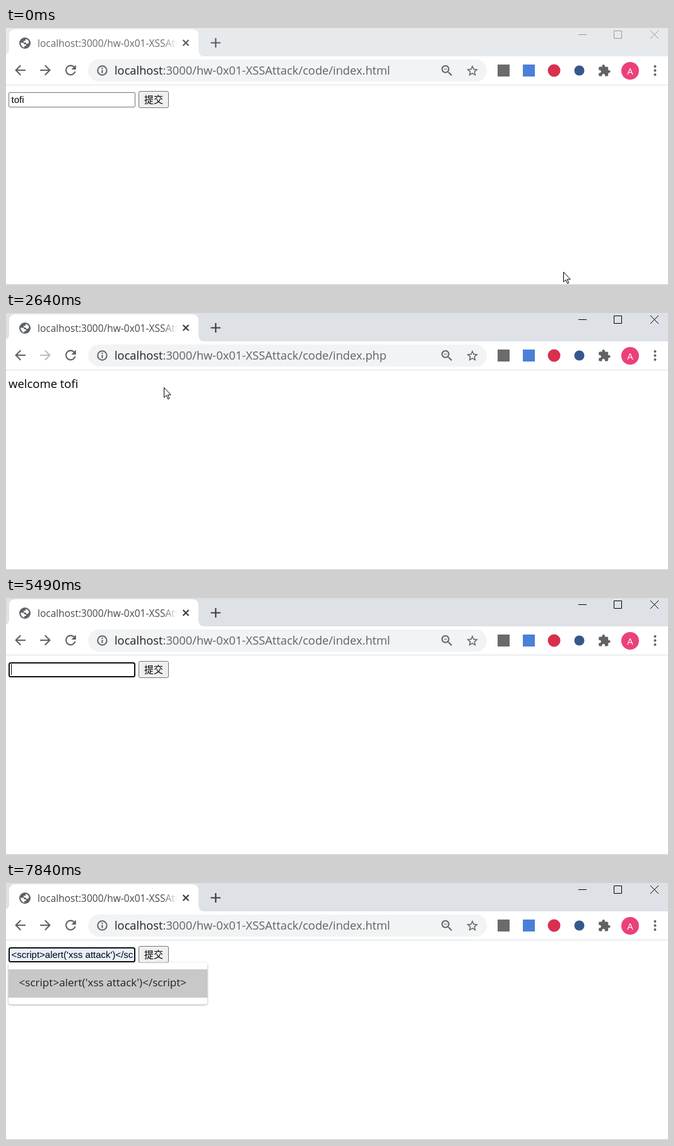
Recreate the animation shown at these times as an HTML page. Size 1049 by 408 pixels, loop 8 s.

```html
<!DOCTYPE html>
<html lang="en">
<head>
<meta charset="utf-8">
<title>Browser form</title>
<style>
  html, body { margin: 0; width: 100%; height: 100%; overflow: hidden; background: #fff; }
  svg { display: block; width: 100vw; height: 100vh; }
  text { white-space: pre; }
  .ui { font-family: "Open Sans", "Noto Sans", sans-serif; }
  .field { font: 15px "Liberation Sans", Arial, sans-serif; }
  .cjk { font: 15px "Noto Sans CJK SC", "Noto Sans CJK", sans-serif; }
  .icon { fill: #5f6368; }
  .line { fill: none; stroke: #5f6368; stroke-width: 2; }
</style>
</head>
<body>
<svg viewBox="0 0 1049 408">
  <defs>
    <linearGradient id="fade">
      <stop offset="0" stop-color="#fff" stop-opacity="0"/>
      <stop offset="1" stop-color="#fff"/>
    </linearGradient>
    <clipPath id="titleClip"><path d="M45 5H270V42H45z"/></clipPath>
    <clipPath id="fieldClip"><path d="M7 103H202V125H7z"/></clipPath>
    <filter id="shadow" x="-10%" y="-20%" width="120%" height="150%">
      <feDropShadow dx="0" dy="1" stdDeviation="1.5" flood-opacity=".4"/>
    </filter>
    <path id="arrowShape" d="M20 11H7.83l5.59-5.59L12 4l-8 8 8 8 1.41-1.41L7.83 13H20v-2z"/>
  </defs>

  <path fill="#fff" d="M0 0H1049V408H0z"/>

  <!-- tab strip -->
  <path id="strip" d="M0 0H1049V45H0z"/>
  <path fill="#fff" d="M0 45V42Q5 40 5 34V12Q5 2 15 2H295Q305 2 305 12V35Q305 45 315 45z"/>
  <g id="globe">
    <circle class="icon" cx="30" cy="24" r="9"/>
    <path fill="#fff" d="M31 17.500q4 .5 5.500 4.500l-1.500 3h-3l-1-2h-3v-2.500l3-.5zM23 23.500h4.500l2 2.500h2.500v2l-3 1v2q-5-1-6-7.500z"/>
  </g>
  <circle id="spinner" r="8.5" pathLength="360" fill="none" stroke-width="2.2"/>
  <g clip-path="url(#titleClip)">
    <text id="title" class="ui" x="50" y="30" font-size="15.5">localhost:3000/hw-0x01-XSSAttack</text>
    <path fill="url(#fade)" d="M248 5H272V42H248z"/>
  </g>
  <path id="tabMarks" fill="none" stroke-width="2.2" d="M280.500 19l9 9m0-9l-9 9M324.500 23.500h15.500M332.300 16v15"/>
  <path id="winButtons" fill="none" d="M907 10.500h13M963.500 4.500h12v12h-12zM1021 4l13 13m0-13l-13 13"/>

  <!-- toolbar -->
  <circle id="backHover" cx="22.5" cy="67.5" r="17.5"/>
  <use href="#arrowShape" class="icon" transform="translate(9.9 54.4) scale(1.05)"/>
  <use id="forward" href="#arrowShape" transform="translate(75.1 54.4) scale(-1.05 1.05)"/>
  <path id="reload" class="icon" transform="translate(89.9 54.4) scale(1.05)" d="M17.65 6.35C16.2 4.9 14.21 4 12 4c-4.42 0-7.99 3.58-7.99 8s3.57 8 7.99 8c3.73 0 6.84-2.55 7.73-6h-2.08c-.82 2.33-3.04 4-5.65 4-3.31 0-6-2.69-6-6s2.69-6 6-6c1.66 0 3.14.69 4.22 1.78L13 11h7V4l-2.35 2.35z"/>
  <path id="stop" class="line" d="M95.500 60l14 14m0-14l-14 14"/>
  <rect x="130" y="50" width="632" height="35" rx="17.5" fill="#f1f3f4"/>
  <circle class="line" cx="152.5" cy="67.5" r="7.2"/>
  <path class="line" d="M152.500 63v2M152.500 66.500v5"/>
  <text class="ui" x="172" y="74" font-size="18.27" fill="#5f6368"><tspan fill="#202124">localhost</tspan>:3000/hw-0x01-XSSAttack/code/index.<tspan id="ext">html</tspan></text>
  <path class="icon" transform="translate(687.1 56.1) scale(.97)" d="M15.5 14h-.79l-.28-.27C15.41 12.59 16 11.11 16 9.5 16 5.91 13.09 3 9.5 3S3 5.91 3 9.5 5.91 16 9.5 16c1.61 0 3.09-.59 4.23-1.57l.27.28v.79l5 4.99L20.49 19l-4.99-5zm-6 0C7.01 14 5 11.99 5 9.5S7.01 5 9.5 5 14 7.01 14 9.5 11.99 14 9.5 14zM7 9h5v1H7z"/>
  <path class="icon" transform="translate(728.2 57.1) scale(.9)" d="M22 9.24l-7.19-.62L12 2 9.19 8.63 2 9.24l5.46 4.73L5.82 21 12 17.27 18.18 21l-1.63-7.03L22 9.24zM12 15.4l-3.76 2.27 1-4.28-3.32-2.88 4.38-.38L12 6.1l1.71 4.04 4.38.38-3.32 2.88 1 4.28L12 15.4z"/>
  <rect x="779" y="58" width="19" height="19" fill="#6b6b6b"/>
  <rect x="819" y="58" width="19" height="19" fill="#4a80d8"/>
  <circle cx="868.5" cy="67.5" r="10" fill="#d9304f"/>
  <circle cx="908.5" cy="67.5" r="8" fill="#35588c"/>
  <path class="icon" transform="translate(937.5 57.2) scale(.88)" d="M20.5 11H19V7c0-1.1-.9-2-2-2h-4V3.5C13 2.12 11.88 1 10.5 1S8 2.12 8 3.5V5H4c-1.1 0-1.99.9-1.99 2v3.8H3.5c1.49 0 2.7 1.21 2.7 2.7s-1.21 2.7-2.7 2.7H2V20c0 1.1.9 2 2 2h3.8v-1.5c0-1.49 1.21-2.7 2.7-2.7 1.49 0 2.7 1.21 2.7 2.7V22H17c1.1 0 2-.9 2-2v-4h1.5c1.38 0 2.5-1.12 2.5-2.5S21.88 11 20.5 11z"/>
  <circle cx="989" cy="68" r="14" fill="#ec407a"/>
  <text class="ui" x="989" y="73.5" font-size="15" fill="#fff" text-anchor="middle">A</text>
  <g class="icon"><circle cx="1028.5" cy="61" r="2"/><circle cx="1028.5" cy="67.5" r="2"/><circle cx="1028.5" cy="74" r="2"/></g>
  <path fill="#dcdee0" d="M0 90H1049V91H0z"/>
  <path fill="#c6c6c6" d="M0 407H1049V408H0z"/>

  <!-- page -->
  <g id="form">
    <rect id="box"/>
    <rect id="selection" x="8" y="105" width="21" height="18" fill="#0078d7"/>
    <g clip-path="url(#fieldClip)"><text id="value" class="field" x="8.5" y="119"></text></g>
    <path id="caret" d="M0 105h1v17h-1z"/>
    <rect id="button" x="210.5" y="100.5" width="47" height="26" rx="2.5" stroke="#767676"/>
    <text class="cjk" x="219" y="119">提交</text>
    <g id="suggest">
      <rect x="4" y="126.5" width="315" height="66" rx="4" fill="#fff" filter="url(#shadow)"/>
      <path id="suggestRow" fill="#c8c8c8" d="M4 137H319V182H4z"/>
      <text class="ui" x="20.5" y="164" font-size="17.1" fill="#202124">&lt;script&gt;alert('xss attack')&lt;/script&gt;</text>
    </g>
  </g>
  <text id="welcome" class="ui" x="4" y="119" font-size="18.5">welcome tofi</text>

  <!-- pointer -->
  <circle id="click" r="15" fill="#ff0" fill-opacity=".55"/>
  <path id="pointer" fill="#fff" stroke="#000" d="M.5.5V16.200l3.600-3.500 2.600 6 2.200-1-2.600-5.700h5z"/>
  <path id="beam" fill="none" stroke="#222" d="M-3 -7.500h2.500l.5.500.5-.5h2.500M0 -7V7M-3 7.500h2.500l.5-.5.5.5h2.500"/>
</svg>
<script>
const LOOP = 8000;
const el = {};
document.querySelectorAll('[id]').forEach(node => el[node.id] = node);

// start, end, steps, destination
const moves = [
  [70, 620, 8, 153, 93],
  [1170, 1470, 5, 250, 118],
  [2880, 3330, 7, 21, 83],
  [3870, 4170, 5, 70, 110],
  [4415, 4640, 4, -20, 110]
];
const payload = "<script>alert('xss attack')<\/script>";

const within = (t, a, b) => t >= a && t < b;
const show = (node, on) => node.style.display = on ? '' : 'none';
const set = (node, attrs) => {
  for (const key in attrs) node.setAttribute(key, attrs[key]);
};
const ease = p => p * p * (3 - 2 * p);

function pointerAt(t) {
  let x = 883, y = 387;
  for (const [start, end, steps, toX, toY] of moves) {
    if (t < start) break;
    const step = Math.floor((t - start) / (end - start) * (steps - 1)) + 1;
    const p = ease(Math.min(1, step / steps));
    x += (toX - x) * p;
    y += (toY - y) * p;
  }
  return [Math.round(x), Math.round(y)];
}

function drawChrome(t, x, y) {
  const active = t >= 780;
  set(el.strip, { fill: active ? '#dee1e6' : '#e7eaed' });
  set(el.title, { fill: active ? '#45494d' : '#686c70' });
  set(el.tabMarks, { stroke: active ? '#3c4043' : '#5a5e62' });
  set(el.winButtons, { stroke: active ? '#000' : '#999' });

  show(el.backHover, Math.hypot(x - 22.5, y - 67.5) < 17.5);
  set(el.backHover, { fill: t >= 3570 ? '#dedede' : '#ececec' });

  const submitting = within(t, 1870, 2640);
  const returning = within(t, 3700, 3940);
  const loading = submitting || returning;
  show(el.globe, !loading);
  show(el.spinner, loading);
  show(el.reload, !loading);
  show(el.stop, loading);
  if (loading) {
    const age = t - (submitting ? 1870 : 3700);
    const committed = submitting && t >= 2410;
    const length = Math.min(100, 30 + age * .12);
    const angle = committed ? (t - 2410) * .6 : -115 - age * .3;
    set(el.spinner, {
      stroke: committed ? '#1a73e8' : '#9a9da1',
      'stroke-dasharray': `${length} 360`,
      transform: `translate(30 24) rotate(${angle})`
    });
  }

  el.ext.textContent = within(t, 2410, 3870) ? 'php' : 'html';
  set(el.forward, { fill: within(t, 2410, 3700) ? '#bcbec1' : '#5f6368' });
}

function drawPage(t, x, overField, overButton) {
  const welcome = within(t, 2410, 3870);
  show(el.welcome, welcome);
  show(el.form, !welcome);

  const focused = t >= 4400;
  const filled = t >= 7840;
  const inset = focused ? 1 : .5;
  set(el.box, {
    fill: filled ? '#e8f0fe' : '#fff',
    stroke: focused ? '#101010' : overField ? '#222' : '#767676',
    'stroke-width': inset * 2,
    x: 4 + inset, y: 102 + inset,
    width: 201 - inset * 2, height: 24 - inset * 2,
    rx: focused ? 2.5 : 1.5
  });
  set(el.button, { fill: overButton ? '#e5e5e5' : '#efefef' });

  el.value.textContent = filled ? payload : t >= 6590 ? '<' : t >= 5490 ? '' : 'tofi';
  const selected = within(t, 4415, 5490) && x < 8;
  show(el.selection, selected);
  set(el.value, { fill: selected ? '#fff' : '#000' });

  show(el.caret, within(t, 5490, 6040) || within(t, 6590, 7140) || within(t, 7680, 7840));
  set(el.caret, { transform: `translate(${t >= 6590 ? 17 : 8} 0)` });

  show(el.suggest, t >= 6680);
  show(el.suggestRow, filled);
}

function drawPointer(t, x, y, beam) {
  const pressed = within(t, 700, 1000) || within(t, 1720, 1870) ||
    within(t, 3570, 3690) || within(t, 4340, 4640);
  show(el.click, pressed);
  set(el.click, { cx: beam ? x - 2 : x - .5, cy: y });
  show(el.pointer, !beam);
  show(el.beam, beam);
  set(beam ? el.beam : el.pointer, {
    transform: `translate(${beam ? x + .5 : x} ${y})`
  });
}

function frame() {
  const t = performance.now() % LOOP;
  const [x, y] = pointerAt(t);
  const formShown = !within(t, 2410, 3870);
  const overField = formShown && x < 205 && within(y, 102, 126);
  const overButton = formShown && within(x, 210, 258) && within(y, 100, 127);
  drawChrome(t, x, y);
  drawPage(t, x, overField, overButton);
  drawPointer(t, x, y, overField);
  requestAnimationFrame(frame);
}
frame();
</script>
</body>
</html>
```
